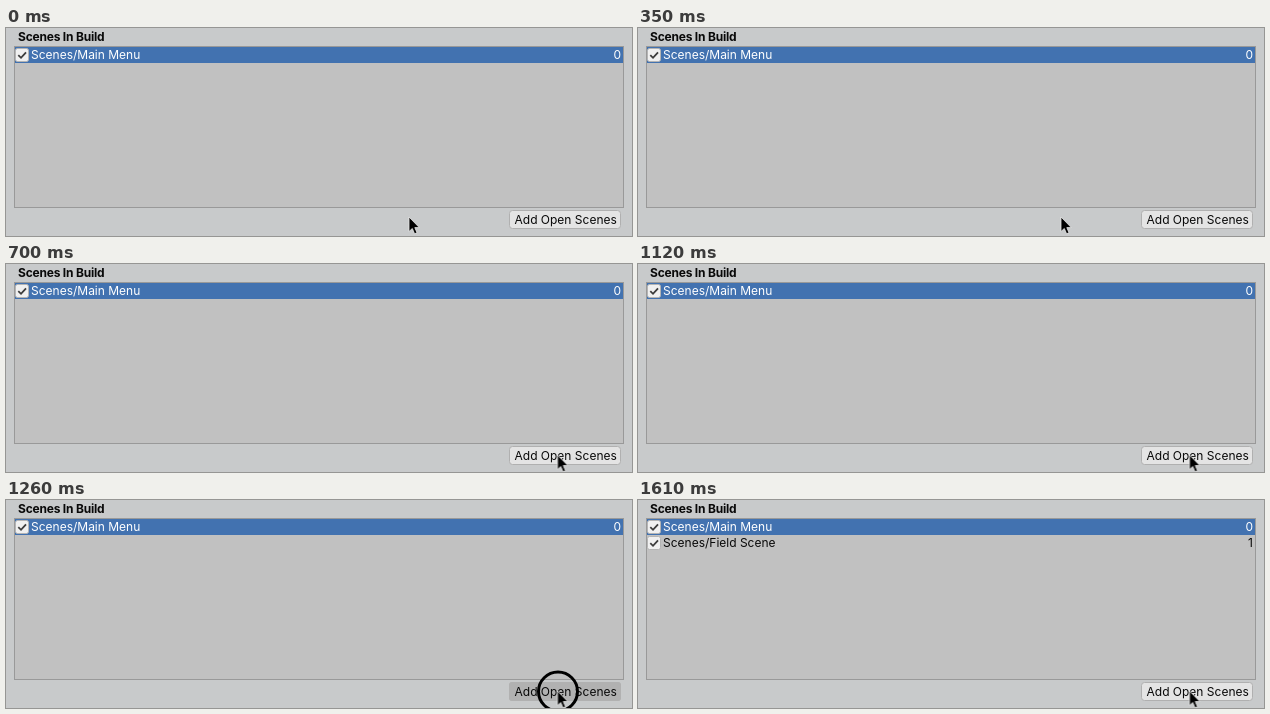
An HTML page for the animation above (1960 ms loop, 626 by 208 pixels).

```html
<!DOCTYPE html>
<html lang="en">
<head>
<meta charset="utf-8">
<title>Scenes In Build</title>
<style>
  html, body { margin: 0; width: 100%; height: 100%; overflow: hidden; background: #c8cacb; }
  svg { display: block; }
  text { font: 12px Inter, "Open Sans", sans-serif; fill: #090909; }
  .title { font-weight: 700; letter-spacing: -.2px; }
  .selected text { fill: #fff; }
  .end { text-anchor: end; }

  .cursor, .click, .added { animation: 1960ms step-end infinite; }
  .cursor { animation-name: travel; }
  .click { animation-name: click; }
  .added { animation-name: added; }

  /* one step is 70 ms, 1/28 of the loop */
  @keyframes travel {
    0% { transform: translate(403px, 189px); }
    3.5714% { transform: translate(404px, 189px); }
    7.1429% { transform: translate(406px, 189px); }
    10.7143% { transform: translate(409px, 189px); }
    14.2857% { transform: translate(414px, 189px); }
    17.8571% { transform: translate(423px, 189px); }
    21.4286% { transform: translate(464px, 189px); }
    25% { transform: translate(508px, 189px); }
    28.5714% { transform: translate(533px, 190px); }
    32.1429% { transform: translate(546px, 191px); }
    35.7143%, 100% { transform: translate(551.5px, 191px); }
  }
  @keyframes click {
    0% { visibility: hidden; }
    60.7143% { visibility: visible; }
    67.8571%, 100% { visibility: hidden; }
  }
  @keyframes added {
    0% { visibility: hidden; }
    67.8571%, 100% { visibility: visible; }
  }
</style>
</head>
<body>
<svg width="626" height="208" viewBox="0 0 626 208">
  <defs>
    <g id="check">
      <rect x="9.5" y="1.5" width="13" height="13" rx="2" fill="#f0f0f0" stroke="#b4b4b4"/>
      <path d="M12.3 8.2 15 10.8 20 5.3" fill="none" stroke="#3c3c3c" stroke-width="1.8"/>
    </g>
  </defs>

  <rect width="626" height="208" fill="#c8cacb"/>
  <text class="title" x="12" y="13">Scenes In Build</text>

  <rect x="8.5" y="18.5" width="609" height="161" fill="#c1c1c1" stroke="#999"/>
  <g class="selected" transform="translate(0 19)">
    <rect x="9" width="608" height="16" fill="#4272b0"/>
    <use href="#check"/>
    <text x="25" y="12">Scenes/Main Menu</text>
    <text class="end" x="615" y="12">0</text>
  </g>
  <g class="added" transform="translate(0 35)">
    <use href="#check"/>
    <text x="25" y="12">Scenes/Field Scene</text>
    <text class="end" x="615" y="12">1</text>
  </g>

  <rect x="503.5" y="182.5" width="111" height="18" rx="3" fill="#e4e4e4" stroke="#b0b0b0"/>
  <rect class="click" x="503" y="182" width="112" height="19" rx="3" fill="#b1b1b1"/>
  <text x="508.5" y="196">Add Open Scenes</text>

  <circle class="click" cx="552" cy="191.5" r="19.5" fill="none" stroke="#000" stroke-width="3"/>
  <path class="cursor" d="M0 0V14.5L3.3 11.5 5.6 16.8 8 15.8 5.8 10.6H10.3Z" fill="#000" stroke="#e8e8e8" stroke-width=".8"/>
</svg>
</body>
</html>
```
